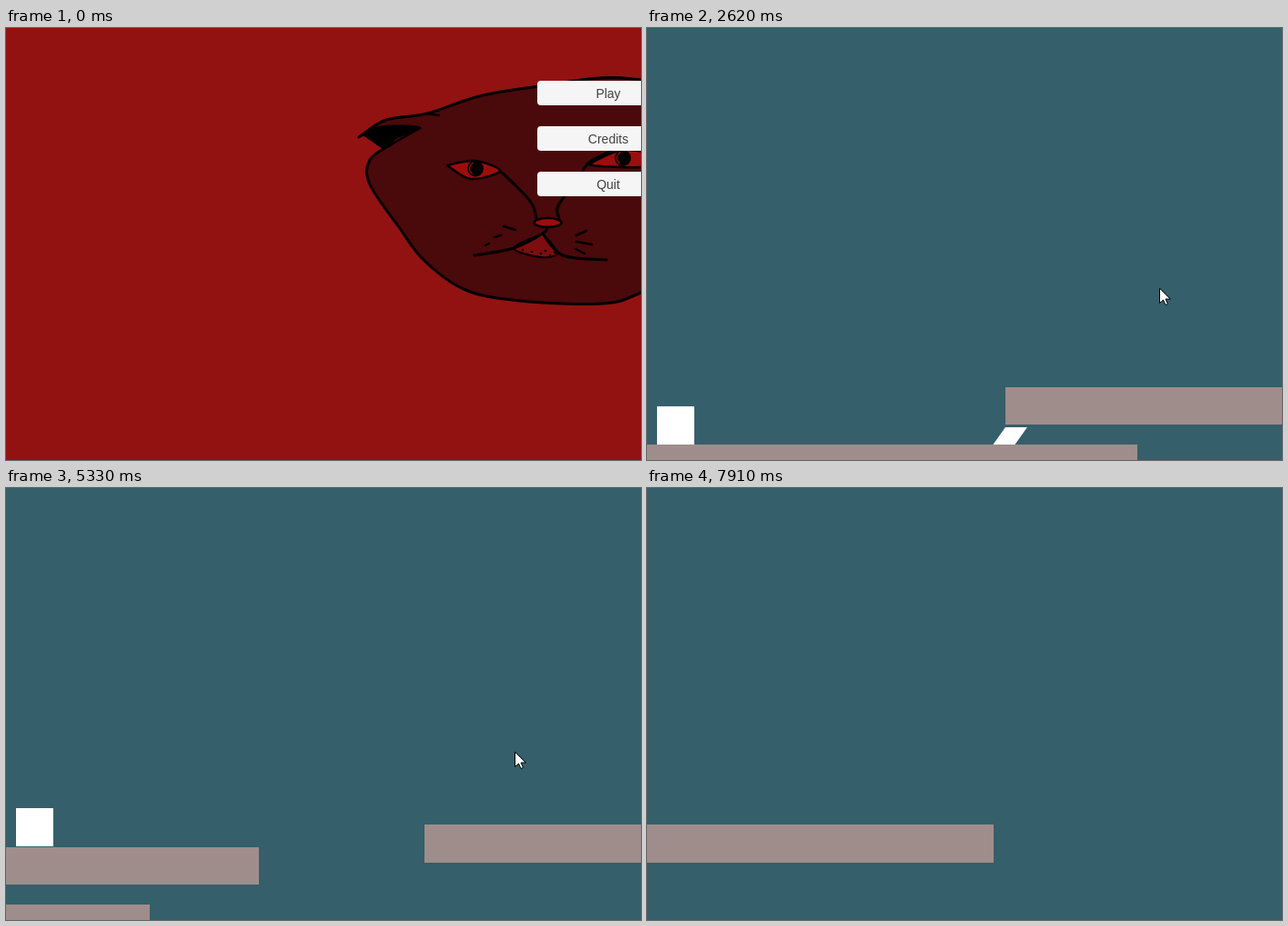
Write an HTML page with a canvas that moves like this. It is 698 px wide and 475 px high and loops after 7.98 s.

```html
<!DOCTYPE html>
<html lang="en">
<head>
<meta charset="utf-8">
<title>Cat menu and block runner</title>
<style>
  html, body { margin: 0; width: 100%; height: 100%; overflow: hidden; background: #355f6b; }
  canvas { display: block; }
</style>
</head>
<body>
<canvas id="stage" width="698" height="475"></canvas>
<script>
const W = 698, H = 475, LOOP = 7980;
const GAME_START = 1010, STEP = 69.697;
const RED = '#9c0d0d', SKIN = '#4a090a', ROCK = '#9f8d8b', WATER = '#355f6b';
const GRAVITY = 1.4; // pixels per step squared
const ctx = document.getElementById('stage').getContext('2d');

const mix = (a, b, k) => a + (b - a) * k;
const span = (t, from, to) => Math.max(0, Math.min(1, (t - from) / (to - from)));

function box(x, y, w, h, fill) {
  ctx.fillStyle = fill;
  ctx.fillRect(Math.round(x), Math.round(y), w, h);
}

function oval(x, y, rx, ry, fill, line) {
  ctx.beginPath();
  ctx.ellipse(x, y, rx, ry, 0, 0, Math.PI * 2);
  paint(fill, line);
}

function paint(fill, line, ink = '#000') {
  if (fill) { ctx.fillStyle = fill; ctx.fill(); }
  if (line) { ctx.strokeStyle = ink; ctx.lineWidth = line; ctx.stroke(); }
}

// Smooth stroke through points given as "x,y x,y ...".
function curve(text, line, fill) {
  const p = text.split(' ').map(s => s.split(',').map(Number));
  const pick = i => p[Math.max(0, Math.min(p.length - 1, i))];
  const handle = (i, sign) => [0, 1].map(j => pick(i)[j] + sign * (pick(i + 1)[j] - pick(i - 1)[j]) / 6);
  ctx.beginPath();
  ctx.moveTo(...p[0]);
  for (let i = 1; i < p.length; i++) {
    ctx.bezierCurveTo(...handle(i - 1, 1), ...handle(i, -1), ...p[i]);
  }
  paint(fill, line);
}

function cursor(x, y) {
  ctx.save();
  ctx.translate(Math.round(x) + .5, Math.round(y) + .5);
  ctx.lineJoin = 'miter';
  const arrow = new Path2D('M0 0V16L4 12.5L6.5 18L9 17L6.5 11.5H11.5Z');
  ctx.fillStyle = '#fff';
  ctx.fill(arrow);
  ctx.strokeStyle = '#000';
  ctx.lineWidth = 1;
  ctx.stroke(arrow);
  ctx.restore();
}

function button(y, label, shade) {
  ctx.beginPath();
  ctx.roundRect(584, y, 156, 27, 4);
  paint(`rgb(${shade},${shade},${shade})`);
  ctx.fillStyle = '#424242';
  ctx.font = '14px "Liberation Sans", Arial, sans-serif';
  ctx.textAlign = 'center';
  ctx.fillText(label, 662, y + 19);
}

function pupil(x, y) {
  oval(x, y, 9, 9, '#000');
  ctx.beginPath();
  ctx.ellipse(x - 1, y, 5.5, 6.5, 0, 2, 4.4);
  paint(null, 1.2, RED);
}

function cat() {
  ctx.lineJoin = ctx.lineCap = 'round';

  // Head, from the ear tip over the top and back up the jaw
  curve('388,120 418,101 463,94 520,75 583,64.5 684,55.5 780,90 780,250 698,291 655,303 ' +
        '565,300 505,288 460,256 432,219 400,172 400,145 425,127 455,110', 3, SKIN);
  curve('463,94 476,96', 2.5);
  curve('388,120 412,108 455,109 430,121 416,132 402,124 393,118', 1, '#000');

  curve('485,151 515,146 543,157 511,166 485,151', 2.5, RED);
  pupil(516, 154.5);
  curve('640,150 680,134 730,145 698,153 655,152 640,150', 2.5, RED);
  pupil(678, 143);

  curve('543,157 562,175 578,193 583,209', 3);
  curve('634,157 642,147 665,135', 3);
  curve('616,182 606,198 608,209', 3);
  oval(595.5, 214, 15, 5, RED, 2.5);

  curve('590,226 606,247 588,252 558,242 590,226', 2, '#7d0d0e');
  curve('595,219 590,226 558,242 515,250', 3);
  curve('590,226 612,250 660,255', 3);
  for (let i = 0; i < 8; i++) oval(568 + i * 5, 244 + (i * 5) % 8, 1.3, 1.3, '#000');

  for (const hair of ['547,218 560,222', '537,230 544,228', '527,239 531,237',
    '627,228 638,223', '627,235 644,238', '626,243 636,248']) curve(hair, 2.5);
}

function menu(t) {
  box(0, 0, W, H, '#921212');
  cat();
  button(58, 'Play', Math.round(mix(245, 200, span(t, 330, 480))));
  button(108, 'Credits', 245);
  button(158, 'Quit', 245);
  if (t >= 70) cursor(mix(692, 662, span(t, 70, 280)), 82);
}

const arc = (n, peak, top) => top + GRAVITY * (n - peak) ** 2;

function hero(n, wall) {
  let y;
  if (n < 35.4) y = Math.min(416.4, 410.4 + 2 * n + GRAVITY * n * n);
  else if (n < 65.35) y = n < 44.3 ? arc(n, 44.3, 305) : Math.min(352.4, arc(n, 44.3, 305));
  else y = arc(n, 74.25, 240.6);
  const top = Math.round(y);
  box(Math.min(11, wall - 41), top, 41, Math.round(y + 41.5) - top, '#fff');
}

// Lands on the ground, then tips over once its support has scrolled away.
function diamond(n) {
  const air = 1 - span(n, 0, 4) ** 1.4;
  const drop = Math.max(0, n - 37.3);
  ctx.save();
  ctx.translate(399.2 + 2.8 * air, 448.5 - 16.7 * air + GRAVITY * drop ** 2);
  ctx.rotate(.175 * air + .09 * drop);
  ctx.transform(1, 0, -13.5 / 19, 1, 0, 0);
  ctx.fillStyle = '#fff';
  ctx.fillRect(-12, -9.5, 24, 19);
  ctx.restore();
}

// Scroll speed changes slightly with the frame rate.
function scrollAt(n) {
  if (n < 52) return mix(810, -131, n / 52);
  if (n < 70) return mix(-131, -461, (n - 52) / 18);
  return mix(-461, -985, (n - 70) / 29);
}

function pointer(n) {
  const glide = span(n, 0, 11), nudge = span(n, 35, 42), shift = span(n, 76, 80);
  const ease = glide * glide * (3 - 2 * glide);
  cursor(662 - 99 * ease - 4 * nudge - 5 * shift,
         82 + 199 * ease + 5 * span(n, 11, 23) + 4 * nudge + shift + 190 * span(n, 88, 94));
}

function game(t) {
  const n = Math.floor((t - GAME_START + 5) / STEP);
  const near = scrollAt(n), far = near + 774;
  const edge = 539 + .538 * (near - 394);

  box(0, 0, W, H, WATER);
  diamond(n);
  box(0, 458, Math.max(0, Math.round(edge)), 17, ROCK);
  box(near, 395, 592, 41, ROCK);
  box(far, 370, 592, 42, ROCK);
  hero(n, far);
  pointer(n);
}

const start = performance.now();
function loop() {
  const t = (performance.now() - start) % LOOP;
  if (t < GAME_START) menu(Math.floor(t / 70) * 70);
  else game(t);
  requestAnimationFrame(loop);
}
loop();
</script>
</body>
</html>
```
